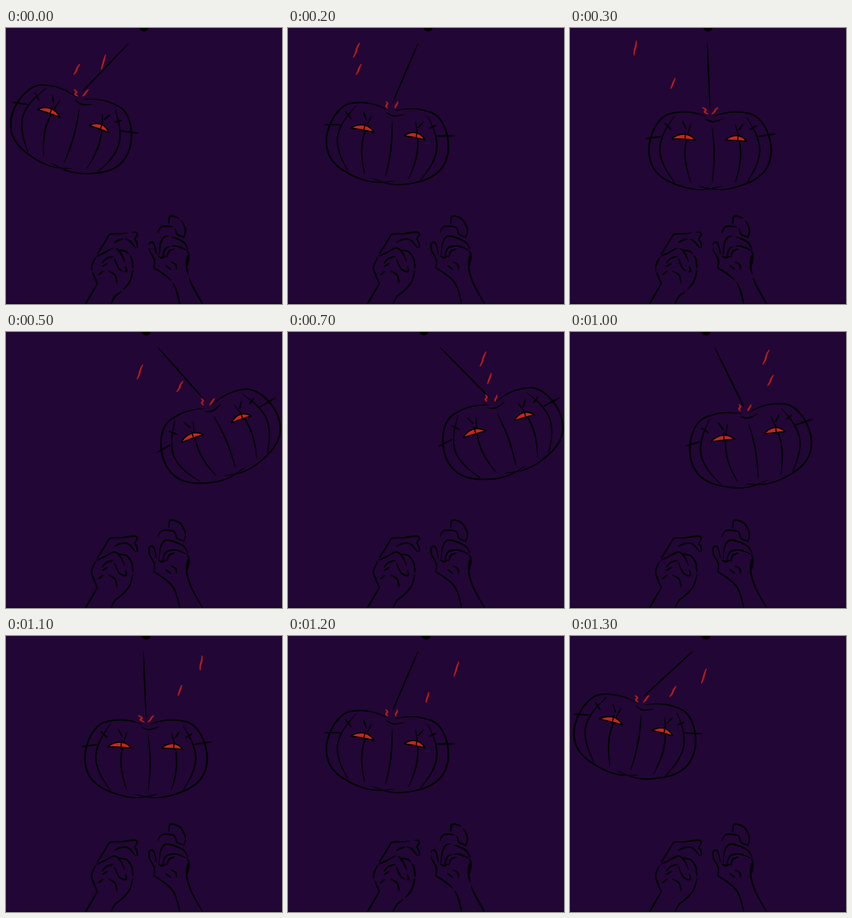
Animation, 400 px wide and 400 px high, one loop 1400 ms. Source, as an HTML page with a canvas:

```html
<!DOCTYPE html>
<html lang="en">
<head>
<meta charset="utf-8">
<title>Swinging pumpkin</title>
<style>
html, body { margin: 0; width: 100%; height: 100%; overflow: hidden; background: #220635; }
canvas { display: block; width: 400px; height: 400px; }
</style>
</head>
<body>
<canvas id="stage" width="400" height="400"></canvas>
<script>
const ctx = document.getElementById('stage').getContext('2d');
const STEP = 100, COUNT = 14;

const points = text => text.split(' ').map(p => p.split(',').map(Number));

// pumpkin, drawn around its own middle
const lobe = points('-5,-53 -24,-58 -44,-59 -67,-53 -83,-33 -90,-4 -84,22 -66,40 -36,52 -10,55 16,50');
const ribs = [[-52, -22], [-28, -9], [3, 3], [37, 8], [54, 19]]; // x, bulge
const ticks = [
  '-95,-20 -72,-23', '69,-23 97,-27', '-67,-43 -57,-33',
  '-41,-46 -35,-34', '42,-32 49,-42', '58,-33 68,-39'
].map(points);

const leftHand = [
  '115,400 121,390 132,371', '133,372 128,360 124,347 130,332',
  '152,400 158,389 168,381 179,368 184,351',
  '146,307 151,299 168,298 187,296 190,300 186,306', '186,305 190,312 190,319',
  '148,302 141,314 132,328', '157,311 165,307 177,307 188,319',
  '131,331 142,326 157,319 166,326 172,339', '162,322 174,324 182,334 184,349',
  '139,341 146,334 156,331', '157,334 164,349 174,353 173,345',
  '139,346 147,341', '148,352 158,358 161,370', '134,358 141,352'
].map(points);

const rightHand = [
  '263,329 262,348 269,371 285,400', '213,347 226,355 240,367 247,381 252,400',
  '218,328 214,312 208,312 208,322 215,336 214,348',
  '220,297 226,288 243,289 248,299 258,303', '236,284 238,273 252,277 260,292 257,305',
  '222,329 224,312 231,302 244,304 258,311 264,321',
  '227,332 232,319 246,316 262,322', '263,322 265,331 263,345',
  '220,330 226,333 232,330', '233,333 236,324 244,320',
  '239,339 246,343 247,350', '231,344 239,350'
].map(points);

// Catmull-Rom point at u in 0..1
function along(pts, u) {
  const n = pts.length - 1, s = Math.min(u * n, n - 1e-6), k = Math.floor(s), t = s - k;
  const at = j => pts[Math.max(0, Math.min(n, j))];
  return [0, 1].map(c => {
    const a = at(k - 1)[c], b = at(k)[c], d = at(k + 1)[c], e = at(k + 2)[c];
    return b + t / 2 * (d - a + t * (2 * a - 5 * b + 4 * d - e + t * (3 * (b - d) + e - a)));
  });
}

// brush stroke over the part from..to of a curve, thin at both ends
function brush(pts, width, color = '#000', from = 0, to = 1) {
  const n = pts.length * 8, left = [], right = [];
  for (let i = 0; i <= n; i++) {
    const u = from + (to - from) * i / n, [x, y] = along(pts, u);
    const p = along(pts, Math.max(0, u - 0.01)), q = along(pts, Math.min(1, u + 0.01));
    const dx = q[0] - p[0], dy = q[1] - p[1], len = Math.hypot(dx, dy) || 1;
    const h = width / 2 * (0.2 + 0.9 * Math.sqrt(Math.max(0, Math.sin(Math.PI * i / n))));
    left.push([x - dy / len * h, y + dx / len * h]);
    right.unshift([x + dy / len * h, y - dx / len * h]);
  }
  ctx.beginPath();
  left.concat(right).forEach(([x, y]) => ctx.lineTo(x, y));
  ctx.fillStyle = color;
  ctx.fill();
}

// swing: steady travel with a rest at either side
function poseAt(i) {
  const raw = 4 - Math.abs(i - 7), p = Math.max(-2, Math.min(2, raw));
  const over = raw - p, p3 = p ** 3;
  const x = 203 + 60.8 * p - 1.5 * p3;
  const y = 180 - 10 * Math.abs(p) ** 1.41 - 1.9 * p + 0.9 * p3 - 2 * over;
  const deg = -8.4 * p - 1.5 * p * p + 3.3 * Math.abs(over) - 1.8 * over;
  const tilt = deg * Math.PI / 180;
  const up = d => [x + d * Math.sin(tilt), y - d * Math.cos(tilt)];
  return { x, y, p, tilt, up };
}

function eye(x, y, w) {
  const h = w / 2;
  ctx.beginPath();
  ctx.moveTo(x - h, y + 2);
  ctx.bezierCurveTo(x - h * 0.4, y - 6, x + h * 0.4, y - 8, x + h, y + 4);
  ctx.quadraticCurveTo(x, y + 2.5, x - h, y + 2);
  ctx.fillStyle = '#c4271c';
  ctx.fill();
  ctx.strokeStyle = '#000';
  ctx.lineWidth = 1.8;
  ctx.lineJoin = 'round';
  ctx.stroke();
  brush([[x + 3, y - 8], [x + 2, y + 5]], 1.5);
}

function pumpkin({ x, y, tilt }) {
  ctx.save();
  ctx.translate(x, y);
  ctx.rotate(tilt);
  ctx.scale(0.985, 0.985);
  brush(lobe, 2.2);
  brush(lobe.map(([a, b]) => [-a, b]), 2.2);
  brush([[-7, -49], [4, -45], [19, -49]], 1.8);
  for (const [rx, bulge] of ribs) {
    const top = -34 - 0.9 * Math.abs(bulge);
    const rib = [0, 0.25, 0.5, 0.75, 1].map(t =>
      [rx + bulge * Math.sin(Math.PI * t), top + (45 - top) * t]);
    brush(rib, 1.9);
  }
  ticks.forEach(t => brush(t, 2));
  eye(-39, -22, 35);
  eye(38.5, -20, 31);
  ctx.restore();
}

// flicks of fire shed by the stem on its way, rising with age
function sparks(i) {
  [0, 0, 1, 2].forEach((age, n) => {
    const [x, y] = poseAt((i - age + COUNT) % COUNT).up(54);
    const side = n ? 1 : -1, lean = side * (3 + 2 * Math.sin(i * 2.4 + n));
    const len = 10 + 6 * age, cx = x + 7 * side - 8 * age, cy = y - 6 - 31 * age;
    brush([
      [cx + lean, cy - len / 2], [cx + 1, cy - len / 6],
      [cx - 1, cy + len / 6], [cx - lean, cy + len / 2]
    ], 2.3, '#b51d1b');
  });
}

// every third drawing of the hands is sketchier, with broken lines
function hands(broken) {
  for (const line of leftHand.concat(rightHand)) {
    if (broken && line.length > 3) {
      brush(line, 2.3, '#000', 0, 0.48);
      brush(line, 2.3, '#000', 0.54, 1);
    } else brush(line, 2.1);
  }
}

function draw(i) {
  const pose = poseAt(i), beat = i % 3;
  ctx.fillStyle = '#220635';
  ctx.fillRect(0, 0, 400, 400);
  ctx.fillStyle = '#190428';
  ctx.fillRect(0, 398.5, 400, 1.5);
  ctx.fillStyle = '#000';
  ctx.beginPath();
  ctx.arc([200, 197, 203][beat], -2, 7, 0, 7);
  ctx.fill();
  brush([[199 + 10.5 * pose.p, 22], pose.up(62)], 1.9);
  pumpkin(pose);
  sparks(i);
  hands(beat === 0);
}

const start = performance.now();
let shown = -1;
function tick(now) {
  const i = Math.floor(Math.max(0, now - start) / STEP) % COUNT;
  if (i !== shown) draw(shown = i);
  requestAnimationFrame(tick);
}
tick(start);
</script>
</body>
</html>
```
